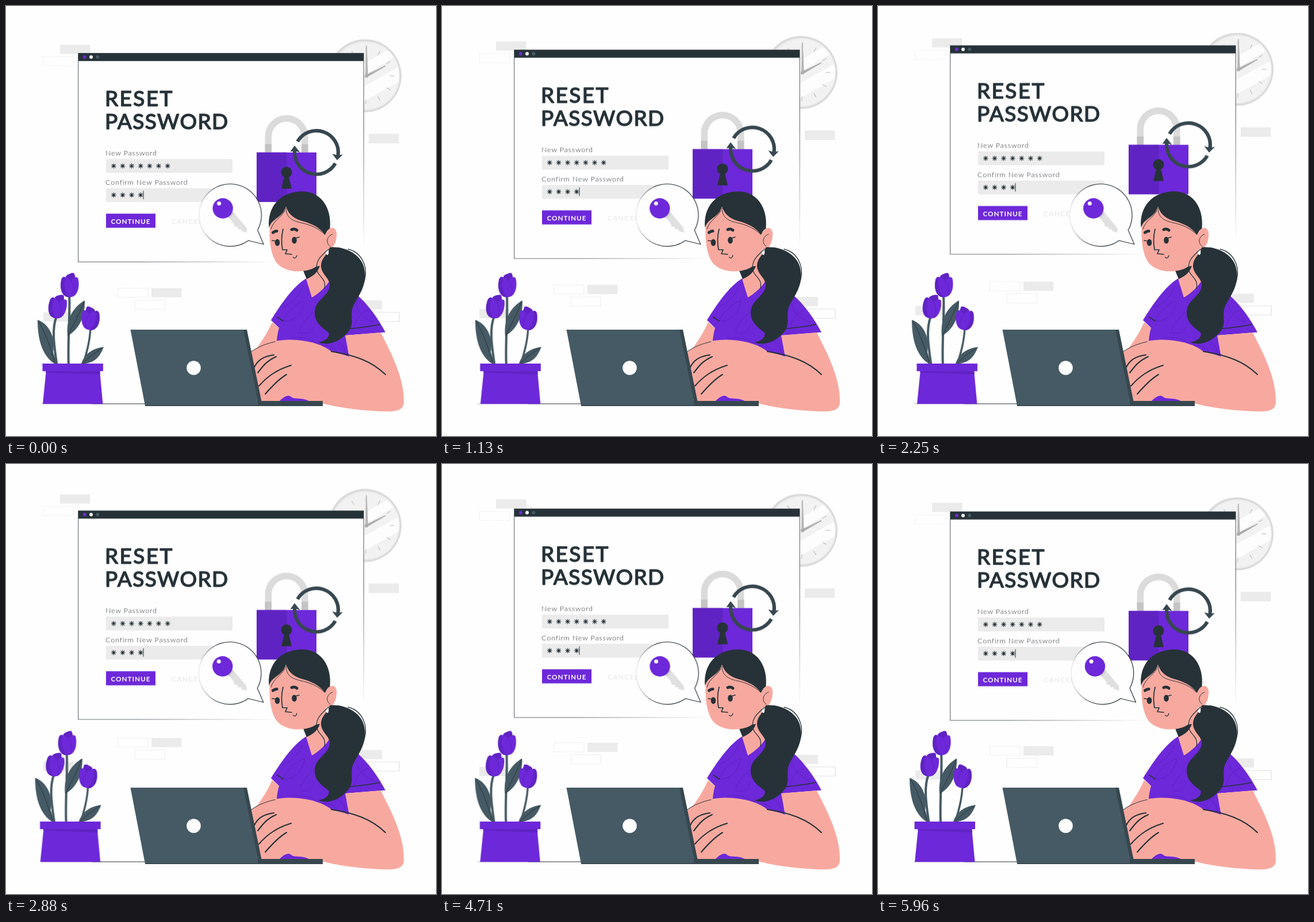
Recreate the animation shown at these times as an HTML page. Size 748x748 px, loop 6000 ms.

```html
<!DOCTYPE html>
<html lang="en">
<head>
<meta charset="utf-8">
<title>Reset password</title>
<style>
  html, body { margin: 0; width: 100%; height: 100%; overflow: hidden; background: #fefefe; }
  svg { display: block; width: 100%; height: 100%; }
  text { font-family: Lato, "Open Sans", sans-serif; fill: #263238; }

  .backdrop { animation: float 6s linear -40ms infinite; }
  .window { animation: float 1.5s linear -40ms infinite; }
  .plant { animation: shake 6s linear -40ms infinite; }
  .bubble { animation: shake 1.5s linear -40ms infinite; }
  @keyframes float { 50% { transform: translateY(-15px); } }
  @keyframes shake {
    0%, 100% { transform: none; }
    10%, 90% { transform: translateX(-1.5px); }
    20%, 80% { transform: translateX(3px); }
    30%, 50%, 70% { transform: translateX(-6px); }
    40%, 60% { transform: translateX(6px); }
  }

  .purple { fill: #6d28d9; }
  .violet { fill: #6023c3; }
  .ink { fill: #263238; }
  .slate { fill: #455a64; }
  .steel { fill: #37474f; }
  .skin { fill: #f8a99f; }
  .pale { fill: #ebebeb; }
  .line { fill: none; stroke: #263238; stroke-width: 1.7; stroke-linecap: round; stroke-linejoin: round; }
  .thin { stroke-width: 1; }
  .bold { stroke-width: 2.1; }
  .brow { stroke-width: 5; }
  .title { font-size: 37px; letter-spacing: 1.4px; stroke: #263238; stroke-width: 1.5px; stroke-linejoin: round; }
  .label { font-size: 12.6px; font-weight: 300; letter-spacing: .8px; }
  .action { font-size: 11.8px; font-weight: 700; letter-spacing: .95px; }
  .confirm { fill: #fff; }
  .cancel { fill: #e6e6e6; font-weight: 400; letter-spacing: 1.5px; }
</style>
</head>
<body>
<svg viewBox="0 0 748 748">
  <defs>
    <linearGradient id="fadeLeft">
      <stop offset="0" stop-color="#e6e6e6" stop-opacity=".4"/>
      <stop offset="1" stop-color="#e0e0e0"/>
    </linearGradient>
    <linearGradient id="fadeRight" gradientUnits="userSpaceOnUse" x1="125" x2="470" y1="0" y2="0">
      <stop offset=".3" stop-color="#263238"/>
      <stop offset="1" stop-color="#263238" stop-opacity="0"/>
    </linearGradient>
    <linearGradient id="fadeDown" gradientUnits="userSpaceOnUse" x1="0" x2="0" y1="97" y2="425">
      <stop offset=".35" stop-color="#263238"/>
      <stop offset="1" stop-color="#263238" stop-opacity="0"/>
    </linearGradient>
    <linearGradient id="fadeBubble" gradientUnits="userSpaceOnUse" x1="337" x2="375" y1="0" y2="0">
      <stop offset="0" stop-color="#263238" stop-opacity=".12"/>
      <stop offset="1" stop-color="#263238"/>
    </linearGradient>
    <clipPath id="face"><circle cx="626" cy="121.5" r="57.5"/></clipPath>
    <g id="star" stroke="#263238" stroke-width="1.1" stroke-linecap="round">
      <path d="M0-4V4M-4 0H4M-2.9-2.9L2.9 2.9M-2.9 2.9L2.9-2.9"/>
      <circle r="1.9" class="ink" stroke="none"/>
    </g>
    <g id="tulip">
      <path class="purple" d="M-7 20C-15 15-17 3-14-10Q-11-16-7-13Q-5-18-1-18Q4-22 8-20Q9-17 10-13Q14-14 15-11C18 1 15 16 7 20Q0 23-7 20Z"/>
      <path class="violet" d="M-7 20C-15 15-17 3-14-10Q-11-15-8-12C-11 2-8 12 0 21.500Q-4 22-7 20Z"/>
      <path class="violet" d="M-6-13Q-4-19 3-19.500L8-20Q9-17 10-13Q4-11 3-6Q0-11-6-13Z"/>
      <path fill="none" stroke="#5a1fbd" stroke-width=".8" d="M3-6Q11 4 7 17"/>
    </g>
  </defs>

  <g class="backdrop">
    <path class="pale" d="M94 67.500h52.500v16H94zM631 222.500h52.500v16.500H631zM253 491h52.500v16H253zM602 512h52v16h-52zM65 533h52v16H65z"/>
    <g fill="#fefefe" stroke="url(#fadeLeft)" stroke-width="1.2">
      <path d="M65 88.500h52.500v16H65zM194.500 491h52.500v16h-52.500zM224 512h52.500v16H224zM631 533h53v16h-53z"/>
    </g>
    <circle cx="624.500" cy="121.500" r="63.500" fill="#dadada"/>
    <circle cx="625" cy="121.500" r="60" fill="#ececec"/>
    <circle cx="626" cy="121.500" r="58" fill="#f2f2f2"/>
    <g clip-path="url(#face)" fill="#fdfdfd">
      <path d="M560 136L690 62V80L560 160ZM560 176L690 102V128L580 190Z"/>
    </g>
    <g id="ticks" stroke="#bdbdbd" stroke-width="1.1"></g>
    <path fill="#c4c4c4" d="M626 69h1.500l2 53h-5z"/>
    <path fill="#acacac" d="M627 69h.6l1.800 53h-2.400zM626 120L660 103.500L660.600 105L628 124Z"/>
    <circle cx="627" cy="122" r="3" fill="#acacac"/>
  </g>

  <g class="window">
    <g transform="translate(0 -.4)">
      <path fill="#fefefe" d="M125.500 83H622V446H125.500z"/>
      <path class="line" d="M125.700 97V446" style="stroke-width:.8"/>
      <path fill="url(#fadeRight)" d="M125.300 446h345v.8h-345z"/>
      <path fill="url(#fadeDown)" d="M621.800 97h.8v328h-.8z"/>
      <path class="ink" d="M125.300 83H622.500v14H125.300z"/>
      <circle class="purple" cx="136.700" cy="90" r="3"/>
      <circle fill="#fff" cx="148" cy="90" r="3"/>
      <circle class="slate" cx="159.300" cy="90" r="3"/>

      <text class="title" x="172" y="175" style="letter-spacing:2.400px">RESET</text>
      <text class="title" x="172" y="215.300">PASSWORD</text>
      <text class="label" x="173" y="261.500">New Password</text>
      <text class="label" x="173" y="312">Confirm New Password</text>
      <path class="pale" d="M174 267.500h220v24H174zM174 318.300h220v24H174z"/>
      <g id="stars"></g>
      <path class="line thin" d="M239 323v14"/>
      <path class="purple" d="M174 362.500h86V387H174z"/>
      <text class="action confirm" x="182.500" y="380">CONTINUE</text>
      <text class="action cancel" x="288" y="380">CANCEL</text>

      <path fill="none" stroke="#dbdbdb" stroke-width="11.500" d="M456.300 256V228.500a31.700 31.700 0 0 1 63.400 0V256"/>
      <path fill="#c4c4c4" d="M450.500 241.500H462V256h-11.500zM514 241.500h11.500V256H514z"/>
      <path class="purple" d="M436 256h104v86H436z"/>
      <path class="violet" d="M436 256h52.500v86H436z"/>
      <circle class="ink" cx="488" cy="290.500" r="9.500"/>
      <path class="ink" d="M484.500 296h7l5.500 23h-18z"/>
      <g fill="none" stroke="#37474f" stroke-width="6.200">
        <path d="M507.100 237A38 38 0 0 1 577.500 262"/>
        <path d="M572.900 275A38 38 0 0 1 502.400 250.700"/>
      </g>
      <path class="steel" d="M567.500 258.500L577 261L586 259.500L576 269.500ZM494.500 254.500L502 244L511.500 256L503 253.500Z"/>
    </g>
  </g>

  <path class="line thin" opacity=".3" d="M62 692H150"/>
  <path class="line thin" d="M150 692H244"/>

  <g class="plant">
    <g fill="none" stroke="#455a64" stroke-width="4">
      <path d="M109 624C107 585 112 540 110 500"/>
      <path d="M88.500 624C84 592 79 562 88 540"/>
      <path d="M134 624C140 604 146 584 147 560" stroke-width="3.400"/>
    </g>
    <g class="slate">
      <path d="M55 546C73 552 87 574 82 602L88 622H84C66 610 55 586 55 546Z"/>
      <path d="M137 512C117 524 104 544 107 574C128 562 138 540 137 512Z"/>
      <path d="M170 593C148 596 136 607 131 622H139C156 619 164 609 170 593Z"/>
    </g>
    <path fill="none" stroke="#263238" stroke-width=".9" d="M57 549C70 572 78 595 85 620M136 514C127 538 116 556 108 574M168 595C154 603 143 612 134 622"/>
    <use href="#tulip" transform="translate(110.500 485)"/>
    <use href="#tulip" transform="translate(89.500 522) rotate(8)"/>
    <use href="#tulip" transform="translate(147.500 543) rotate(4) scale(-1 .97)"/>
    <path class="purple" d="M70 633H163L168.500 692.300H64Z"/>
    <path class="violet" d="M69.500 635H163.500L164 641L69 637.500Z"/>
    <path class="purple" d="M63.500 622H169v13.300H63.500z"/>
  </g>

  <!-- figure -->
  <path class="skin" d="M463 550C455 568 445 583 437 594L424 604L440 690H500L486 570Z"/>
  <path class="purple" d="M522 474C500 487 478 519 461 546.500L475 560C472 570 471 580 470 592L478 690H560L597 611L591 573L660 567.500C648 545 632 521 610 502L562 476Z"/>
  <g fill="none" stroke="#5c20c0" stroke-width=".9">
    <path d="M480 523C495 520 510 505 516 488M482 548C500 550 516 535 520 512C505 518 490 530 482 548M510 566C517 548 530 535 540 530M495 577C510 577 530 575 545 590M511 568C525 572 535 565 536 552M608 518C612 532 622 545 640 550M605 560C608 545 622 528 630 530"/>
    <path d="M575 583C585 585 590 595 590 606M550 591C565 589 575 597 576 604"/>
  </g>
  <path class="line" d="M472 541L482 548M592 562C612 560 632 558 650 554"/>
  <path class="skin" d="M517 445L523 478L532 507C544 500 558 488 563 477L560 420Z"/>
  <path class="ink" d="M516 458L523 475C534 470 542 464 546 452Z"/>
  <path class="skin" d="M459 378C457 405 460 432 471 447C485 464 516 465 535 456C550 448 558 435 562 423C571 422 576 406 575 394C573 383 562 384 557 394L552 350H482Z"/>
  <path class="ink" d="M457.500 386C454 349 477 322.500 516 322.500C548 323 567 351 563.500 387C559 389 557 394 555 398C545 384 530 378 515 374C500 370 491 361 487 349C483 362 473 367 466 373C461 377 459 381 457.500 386Z"/>
  <path class="line thin" d="M487 352C487 369 500 374 513 377C532 381 545 388 554 397M485 356C478 369 465 373 461 388M564 418C554 411 560 399 568 397"/>
  <path class="line brow" d="M464.500 394Q468 391.500 471 391.500M497 389Q502 386.500 506 390"/>
  <ellipse class="ink" cx="472" cy="411.500" rx="4.300" ry="6"/>
  <ellipse class="ink" cx="501.500" cy="407.500" rx="4.300" ry="6"/>
  <path class="line" d="M463 408L470 409M503 404L510 402M482 388C479 400 479 413 481 424H489L486 431L497 432"/>
  <path class="line" d="M499.500 437Q504 441 506 434" style="stroke-width:1.300"/>
  <path class="ink" d="M563 420C588 417 615 431 622 452C632 483 612 505 604 522C597 538 607 550 596 566C582 584 560 592 543 585C556 583 564 576 561 568C548 558 536 549 537 532C538 512 560 505 563 488C565 474 549 468 548 453C548 437 560 433 563 420Z"/>
  <ellipse cx="559" cy="428" rx="2.300" ry="5" fill="#fff"/>
  <path class="line" d="M561 423C546 436 536 446 542 463C547 473 557 475 554 491M595 423C618 428 630 453 624 475C621 488 612 496 609 508" style="stroke-width:1.300"/>

  <path class="skin" d="M424 604C445 587 474 578 505 581C532 583 552 590 566 601C577 604 587 606 597 610L590 573L652 568C665 595 694 645 692 690C691 706 674 706 650 705C610 703 575 698 545 690H440Z"/>
  <path class="purple" d="M474 689C482 680 491 675 496 680C502 685 514 680 529 688L520 691Z"/>
  <path class="line bold" d="M566 601C605 607 635 617 660 641M431 630C438 615 449 609 466 607M438 638C447 626 454 617 470 610M440 661C454 645 470 633 496 625M451 675C464 660 476 648 488 641"/>
  <path class="line thin" d="M427 601C440 592 454 587 468 584"/>

  <path class="steel" d="M409 563H419L445 690L440 695.500Z"/>
  <path class="slate" d="M216.500 563H413L440 695.500H242Z"/>
  <path class="steel" d="M438 687H551V695.500H438Z"/>
  <path class="steel" d="M242 694.300H551v1.700H242z"/>
  <circle cx="326.500" cy="629.500" r="12.300" fill="#fefefe"/>

  <g class="bubble">
    <path fill="#fefefe" stroke="url(#fadeBubble)" stroke-width="1.2" stroke-linejoin="round" d="M438 390A54.300 54.300 0 1 0 422 408L448.500 414.500Z"/>
    <path fill="#e0e0e0" d="M384 362L392 354L419 386L419.500 394L411 392L409 388L405 389L403 384L398 384L397 379Z"/>
    <path fill="#cfcfcf" d="M386 366L394 358L397 361L389 370Z"/>
    <circle class="purple" cx="377.500" cy="352" r="17.700"/>
    <circle cx="371" cy="343.500" r="3.500" fill="#fff"/>
  </g>
</svg>
<script>
  const fill = (id, count, draw) => {
    document.getElementById(id).innerHTML = Array.from({ length: count }, (_, i) => draw(i)).join("");
  };
  const star = (i, y) => `<use href="#star" x="${187.3 + 15.65 * i}" y="${y}"/>`;
  fill("stars", 11, i => i < 7 ? star(i, 279.5) : star(i - 7, 330));
  fill("ticks", 12, i => `<path d="M626 72v8" transform="rotate(${30 * i} 626 121.5)"/>`);
</script>
</body>
</html>
```
